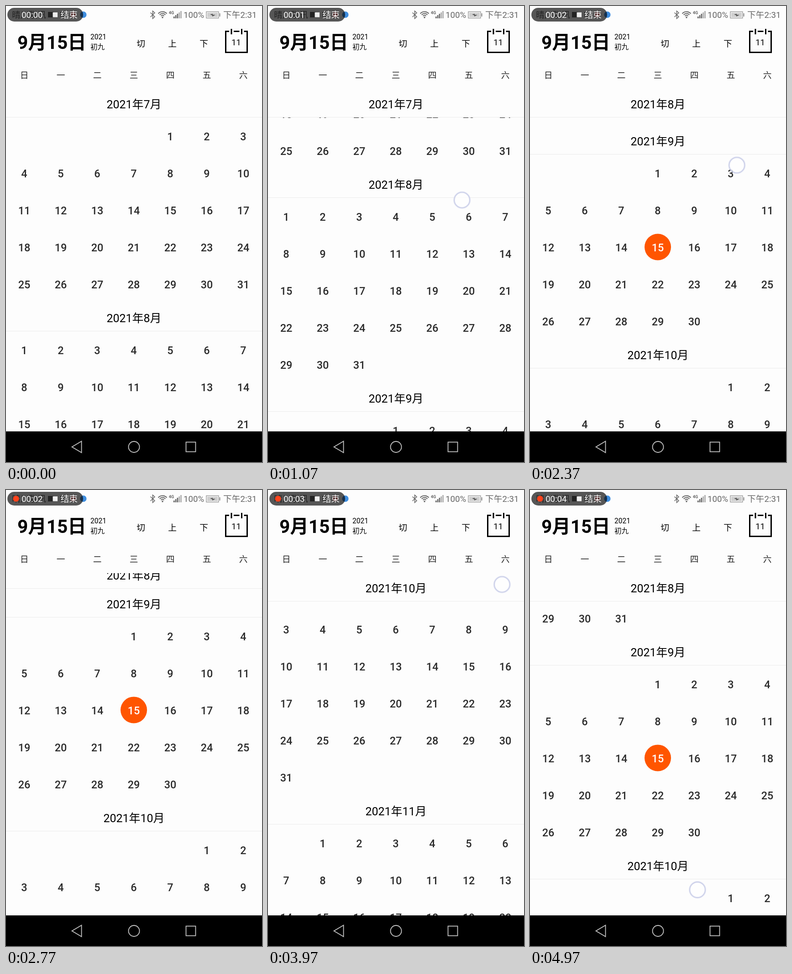
Animation of 561x998 px, one loop 5.01 s. Source, as an HTML page with a canvas:

```html
<!DOCTYPE html>
<html lang="zh-CN">
<head>
<meta charset="utf-8">
<title>日历</title>
<style>
  html, body { margin: 0; width: 100%; height: 100%; overflow: hidden; background: #fdfdfd; }
  canvas { display: block; }
</style>
</head>
<body>
<canvas id="stage" width="561" height="998"></canvas>
<script>
const ctx = document.getElementById('stage').getContext('2d');
const LOOP = 5010, WIDTH = 561, HEIGHT = 998;
const PAPER = '#fdfdfd', GRAY = '#666';
const FAMILY = 'Roboto, "Noto Sans CJK SC", "Noto Sans CJK", sans-serif';
const DP = 1.558;
const LIST_TOP = 182, LIST_BOTTOM = 931;
const TITLE_Y = 215, FIRST_ROW_Y = 286, ROW = 81, HEADER = 63;
const FINGER_LEAD = 18;
const SECOND = 1030, CLOCK_START = 140;

const columnX = i => 40 + 80 * i;
const lerp = (a, b, u) => a + (b - a) * u;
const flick = u => u * (2 - u);
const drag = u => u * u * (3 - 2 * u);

// While touched, finger y plus scroll stays at `anchor`
const gestures = [
  { start: 300, end: 1700, scroll: 366, anchor: 721, fromX: 345, toX: 444, ease: flick },
  { start: 1700, end: 2650, scroll: 901, anchor: 1209, fromX: 311, toX: 465, ease: flick },
  { start: 2820, end: 3970, scroll: 1465, anchor: 1668, fromX: 321, toX: 513, ease: flick },
  { start: 3970, end: 4970, scroll: 796, anchor: 1671, fromX: 513, toX: 367, ease: drag }
];
gestures.forEach((g, i) => g.from = i ? gestures[i - 1].scroll : 0);

const months = [];
for (let month = 7, top = 0; month <= 12; month++) {
  const offset = new Date(2021, month - 1, 1).getDay();
  const days = new Date(2021, month, 0).getDate();
  months.push({ month, top, offset, days });
  top += HEADER + ROW * Math.ceil((offset + days) / 7);
}

const progress = (g, t) => g.ease(Math.min(1, Math.max(0, (t - g.start) / (g.end - g.start))));
const scrollAt = (g, t) => lerp(g.from, g.scroll, progress(g, t));

function text(str, x, baseline, size, color = '#000', align = 'center', weight = 400) {
  ctx.font = `${weight} ${size}px ${FAMILY}`;
  ctx.textAlign = align;
  ctx.fillStyle = color;
  ctx.fillText(str, x, baseline);
}

function box(x, y, w, h, color) {
  ctx.fillStyle = color;
  ctx.fillRect(x, y, w, h);
}

function frame(x, y, w, h, color, width) {
  ctx.strokeStyle = color;
  ctx.lineWidth = width;
  ctx.strokeRect(x, y, w, h);
}

function disc(x, y, r, color) {
  ctx.fillStyle = color;
  ctx.beginPath();
  ctx.arc(x, y, r, 0, 2 * Math.PI);
  ctx.fill();
}

function ring(x, y, r, color, width, from = 0, to = 2 * Math.PI) {
  ctx.strokeStyle = color;
  ctx.lineWidth = width;
  ctx.beginPath();
  ctx.arc(x, y, r, from, to);
  ctx.stroke();
}

function outline(d, color, width) {
  ctx.strokeStyle = color;
  ctx.lineWidth = width;
  ctx.stroke(new Path2D(d));
}

function monthTitle(month, y) {
  text(`2021年${month}月`, WIDTH / 2, y + 9, 16 * DP);
  box(0, y + 28, WIDTH, 1, '#ebebeb');
}

function drawMonth({ month, top, offset, days }, scroll) {
  const shift = top - scroll;
  monthTitle(month, TITLE_Y + shift);
  for (let day = 1; day <= days; day++) {
    const cell = offset + day - 1;
    const x = columnX(cell % 7);
    const y = FIRST_ROW_Y + shift + ROW * Math.floor(cell / 7);
    const today = month === 9 && day === 15;
    if (today) disc(x, y - 1.6, 29, '#ff5500');
    text(day, x, y + 8.3, 15 * DP, today ? '#fff' : '#2b2b2b', 'center', 500);
  }
}

function drawList(scroll) {
  ctx.save();
  ctx.beginPath();
  ctx.rect(0, LIST_TOP, WIDTH, LIST_BOTTOM - LIST_TOP);
  ctx.clip();
  months.forEach(m => drawMonth(m, scroll));

  // Sticky title, pushed up by the next one
  const index = months.filter(m => m.top <= scroll).length - 1;
  const push = Math.min(0, months[index + 1].top - scroll - HEADER);
  box(0, LIST_TOP, WIDTH, HEADER - 1 + push, PAPER);
  monthTitle(months[index].month, TITLE_Y + push);
  ctx.restore();
}

function drawHeader() {
  text('9月15日', 25, 94, 26 * DP, '#000', 'left', 700);
  text('2021', 185, 73, 10 * DP, '#000', 'left');
  text('初九', 185, 95, 10 * DP, '#000', 'left');
  [...'切上下'].forEach((s, i) => text(s, 295.5 + 69 * i, 88.5, 12 * DP));
  [...'日一二三四五六'].forEach((s, i) => text(s, columnX(i), 157.5, 12 * DP, '#222'));

  // Calendar button: a frame with two binder pins
  frame(481.5, 55.5, 47, 46, '#000', 3);
  [494, 516.5].forEach(x => {
    box(x - 5, 53, 10, 5, PAPER);
    box(x - 1.5, 50, 3, 12, '#000');
  });
  text('11', 504.5, 86, 12 * DP);
}

function drawStatus() {
  outline('M316.5 14.5l9.5 9-4.5 4V11l4.5 4-9.5 9', GRAY, 1.5);
  for (let r = 4.5; r < 14; r += 4) ring(343, 25, r, GRAY, 2, -Math.PI * 0.77, -Math.PI * 0.23);
  disc(343, 25, 1.8, GRAY);
  text('4G', 362.5, 18, 9, GRAY, 'center', 700);
  for (let i = 0; i < 5; i++) {
    const h = 4 + 3 * i;
    box(367 + 3.8 * i, 27 - h, 2.6, h, i < 3 ? GRAY : '#aaa');
  }
  text('100%', 389, 26, 12 * DP, GRAY, 'left');

  frame(439, 12.5, 27, 14, '#8c8c8c', 1.2);
  box(441, 14.5, 23, 10, '#cfcfcf');
  box(467.5, 16, 2, 7, '#8c8c8c');
  ctx.fillStyle = '#555';
  ctx.fill(new Path2D('M447 18.5l6-1.5v2l6 .5-7 3.5v-2.5z'));
  text('下午2:31', 476, 26, 12 * DP, GRAY, 'left');
}

function drawRecorder(t) {
  text('晴川联讯', 13, 26, 12 * DP, GRAY, 'left');
  box(92, 13, 12, 12, GRAY);
  box(119, 13, 11, 12, '#888');
  disc(147, 19, 6, '#c65050');
  disc(169.5, 19, 7, '#3f8ee0');

  ctx.fillStyle = 'rgba(0,0,0,.66)';
  ctx.beginPath();
  ctx.roundRect(3, 4, 166, 30, 15);
  ctx.fill();

  // The record light is lit in the second half of each second
  const clock = (t + CLOCK_START) / SECOND;
  if (clock % 1 > 0.5) disc(22, 19, 6.6, '#ff431c');
  text(`00:0${Math.floor(clock)}`, 34, 26, 12 * DP, '#fff', 'left');
  box(102.5, 14, 10.5, 10.5, '#eee');
  text('结束', 119.5, 26, 12 * DP, '#fff', 'left');
}

function drawNavigation() {
  const color = '#c4c4c4';
  box(0, LIST_BOTTOM, WIDTH, HEIGHT - LIST_BOTTOM, '#000');
  outline('M144.5 965l21-12.5v25z', color, 1.8);
  ring(280.5, 965, 12, color, 1.8);
  frame(394.5, 954.5, 21, 21, color, 1.8);
}

function drawTouch(g, t) {
  const ahead = t + FINGER_LEAD;
  const x = lerp(g.fromX, g.toX, progress(g, ahead));
  const y = g.anchor - scrollAt(g, ahead);
  disc(x, y, 17, 'rgba(255,255,255,.75)');
  ring(x, y, 17.2, 'rgba(200,205,235,.4)', 4);
  ring(x, y, 17, '#cbcfe8', 1.8);
}

function draw(t) {
  const gesture = gestures.filter(g => g.start <= t).pop();
  box(0, 0, WIDTH, HEIGHT, PAPER);
  drawList(gesture ? scrollAt(gesture, t) : 0);
  drawHeader();
  drawStatus();
  drawRecorder(t);
  drawNavigation();
  // A flick lifts the finger shortly before the list comes to rest
  const touching = gesture && (gesture.ease === drag || progress(gesture, t) < 0.97);
  if (touching) drawTouch(gesture, t);
}

ctx.lineJoin = 'miter';
const start = performance.now();
function tick() {
  draw((performance.now() - start) % LOOP);
  requestAnimationFrame(tick);
}
tick();
</script>
</body>
</html>
```
